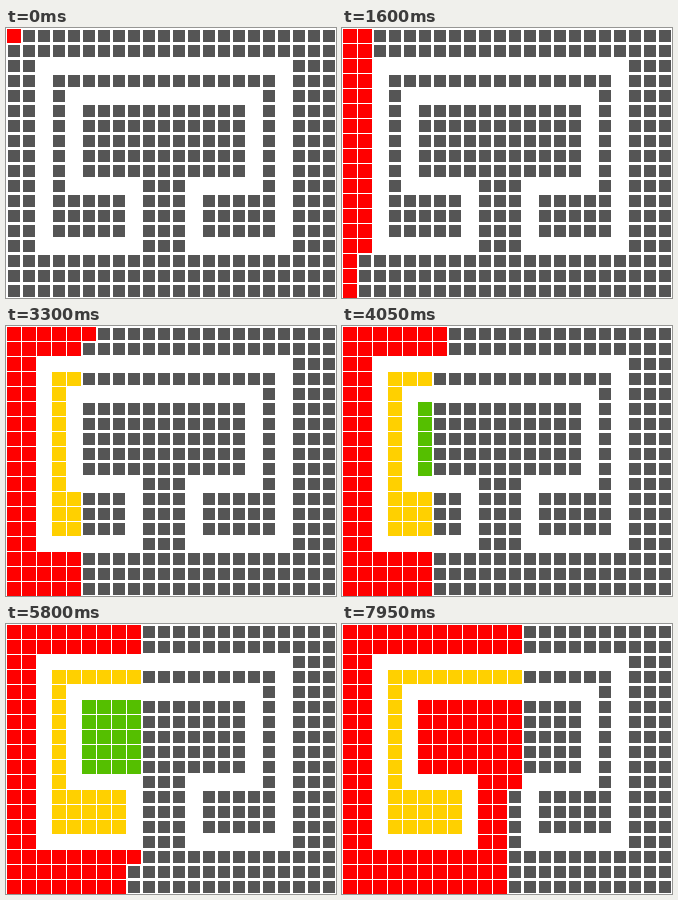
Recreate the animation shown at these times as an HTML page with a canvas. Size 330 px wide and 270 px high, loop 8000 ms.

```html
<!DOCTYPE html>
<html lang="en">
<head>
<meta charset="utf-8">
<title>Region labelling</title>
<style>
  html, body { margin: 0; width: 100%; height: 100%; overflow: hidden; background: #fff; }
  canvas { display: block; }
</style>
</head>
<body>
<canvas id="stage" width="330" height="270"></canvas>
<script>
const CELL = 15, COLS = 22, ROWS = 18;
const STEP_MS = 50, LOOP_MS = 8000;
const IDLE = '#555555';
const COLORS = ['#ff0000', '#ffd000', '#55bf00'];

const full = '#'.repeat(COLS);
const block = '##.#.###########.#.###';
const feet = '##.#####.###.#####.###';
const grid = [
  full,
  full,
  '##.................###',
  '##.###############.###',
  '##.#.............#.###',
  block, block, block, block, block,
  '##.#.....###.....#.###',
  feet, feet, feet,
  '##.......###.......###',
  full, full, full
];

// Filled cells in scan order: down each column, left to right.
const cells = [];
for (let col = 0; col < COLS; col++) {
  for (let row = 0; row < ROWS; row++) {
    if (grid[row][col] === '#') cells.push({ col, row });
  }
}

const ctx = document.getElementById('stage').getContext('2d');

// Labels the first `count` cells, merging regions that meet.
function labelCells(count) {
  const parent = [];
  const labels = new Map();
  const key = (col, row) => col * ROWS + row;
  const find = n => {
    while (parent[n] !== n) n = parent[n];
    return n;
  };
  for (const { col, row } of cells.slice(0, count)) {
    const up = row > 0 ? labels.get(key(col, row - 1)) : undefined;
    const left = col > 0 ? labels.get(key(col - 1, row)) : undefined;
    const roots = [up, left].filter(n => n !== undefined).map(find);
    let label = parent.length;
    if (roots.length) {
      label = Math.min(...roots);
      roots.forEach(n => { parent[n] = label; });
    } else {
      parent.push(label);
    }
    labels.set(key(col, row), label);
  }
  return (col, row) => find(labels.get(key(col, row)));
}

function draw(step) {
  const count = step + 1;
  const labelAt = labelCells(count);
  ctx.fillStyle = '#fff';
  ctx.fillRect(0, 0, COLS * CELL, ROWS * CELL);
  cells.forEach(({ col, row }, i) => {
    const done = i < count;
    const inset = done ? 1 : 2;
    const size = done ? 14 : 12;
    ctx.fillStyle = done ? COLORS[labelAt(col, row) % COLORS.length] : IDLE;
    ctx.fillRect(col * CELL + inset, row * CELL + inset, size, size);
  });
}

const start = performance.now();
let shown = -1;

function tick() {
  const time = (performance.now() - start) % LOOP_MS;
  const step = Math.floor(time / STEP_MS);
  if (step !== shown) {
    draw(step);
    shown = step;
  }
  requestAnimationFrame(tick);
}
tick();
</script>
</body>
</html>
```
